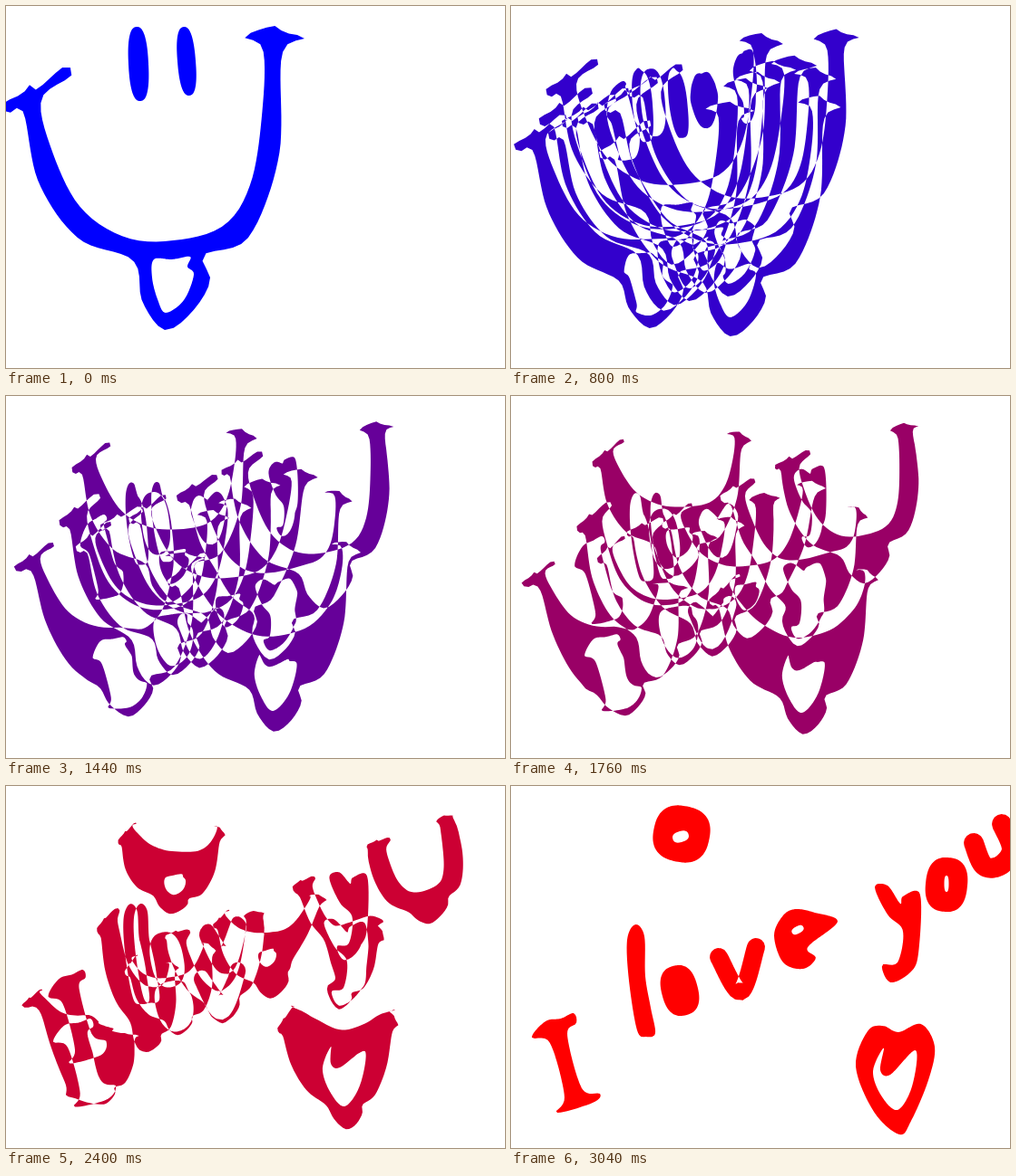
Write an HTML page with a canvas that moves like this. It is 550x400 px and loops after 3200 ms.

```html
<!DOCTYPE html>
<html>
<head>
<meta charset="utf-8">
<style>
html, body { margin: 0; width: 100%; height: 100%; overflow: hidden; background: #fff; }
canvas { display: block; }
</style>
</head>
<body>
<canvas id="stage" width="550" height="400"></canvas>
<script>
const ctx = document.getElementById('stage').getContext('2d');
const STEPS = 20, STEP_MS = 160, SAMPLES = 40;
const { PI, abs, cos, sin, sign, hypot, round, floor, min, max } = Math;

const lerp = (a, b, t) => a + (b - a) * t;
const range = (n, fn) => Array.from({ length: n }, (_, i) => fn(i));

function spline(p0, p1, p2, p3, t) {
  return p1.map((b, k) => {
    const a = p0[k], c = p2[k], d = p3[k];
    return b + t / 2 * (c - a + t * (2 * a - 5 * b + 4 * c - d + t * (3 * (b - c) + d - a)));
  });
}

// Spread SAMPLES evenly spaced points along an open polyline.
function resample(line) {
  const dist = [0];
  for (let i = 1; i < line.length; i++)
    dist.push(dist[i - 1] + hypot(line[i][0] - line[i - 1][0], line[i][1] - line[i - 1][1]));
  let i = 1;
  return range(SAMPLES, n => {
    const d = dist[dist.length - 1] * n / SAMPLES;
    while (dist[i] < d) i++;
    const t = (d - dist[i - 1]) / (dist[i] - dist[i - 1] || 1);
    return line[i].map((v, k) => lerp(line[i - 1][k], v, t));
  });
}

const parse = text => text.split(' ').map(p => p.split(',').map(Number));

// Every contour runs clockwise in four sections starting at its left, top, right and bottom.
function outline(text) {
  const sections = text.split('/').map(parse), points = sections.flat();
  const at = i => points[(i + points.length) % points.length];
  let start = 0;
  return sections.flatMap(({ length }) => {
    const line = range(length * 8 + 1, n => {
      const i = start + floor(n / 8);
      return spline(at(i - 1), at(i), at(i + 1), at(i + 2), n % 8 / 8);
    });
    start += length;
    return resample(line);
  });
}

function oval(cx, cy, rx, ry, tilt = 0) {
  const soft = v => sign(v) * abs(v) ** 0.8;
  return range(SAMPLES * 4, i => {
    const a = PI + i / SAMPLES * PI / 2, x = rx * soft(cos(a)), y = ry * soft(sin(a));
    return [cx + x * cos(tilt) - y * sin(tilt), cy + x * sin(tilt) + y * cos(tilt)];
  });
}

// A round-ended brush stroke drawn from its left tip to its right tip.
function brush(radius, text) {
  const keys = parse(text), last = keys.length - 1;
  const at = i => keys[max(0, min(last, i))];
  const path = range(last * 12 + 1, n => {
    const i = floor(n / 12);
    return spline(at(i - 1), at(i), at(i + 1), at(i + 2), n % 12 / 12);
  });
  const angle = i => {
    const a = path[max(0, i - 1)], b = path[min(path.length - 1, i + 1)];
    return Math.atan2(b[1] - a[1], b[0] - a[0]);
  };
  const edge = (i, turn) => [path[i][0] + radius * cos(angle(i) + turn), path[i][1] + radius * sin(angle(i) + turn)];
  const end = path.length - 1, mid = end / 2;
  const cap = (i, from) => range(5, k => edge(i, from + k * PI / 8));
  const side = (from, turn) => range(mid + 1, k => edge(from + k * (turn < 0 ? 1 : -1), turn));
  return [
    [...cap(0, -PI), ...side(0, -PI / 2)],
    [...side(mid, -PI / 2), ...cap(end, -PI / 2)],
    [...cap(end, 0), ...side(end, PI / 2)],
    [...side(mid, PI / 2), ...cap(0, PI / 2)]
  ].flatMap(resample);
}

const face = {
  smile: outline('-4,108 18,97 25,87 34,92 64,67 72,77 39,103 50,158 80,220 125,253' +
    '/175,260 238,244 270,195 283,110 283,47 263,34 296,22 306,29' +
    '/329,36 304,54 301,165 267,256 218,275 225,304 205,338' +
    '/175,358 150,326 140,281 80,257 36,195 19,117 2,119'),
  tongue: outline('161,300 163,280/183,280 203,277 200,288/207,297 196,325/176,339 167,324'),
  eyeL: oval(146, 64, 11, 41, -0.05),
  eyeR: oval(199, 61, 10, 38, -0.08)
};

const letters = {
  I: outline('23,278 38,260 55,257/69,251 72,262 62,275 78,334/98,340/90,350 50,361 59,343 43,284'),
  l: outline('128,170 137,153 147,166/148,210/154,245 159,273/149,277 139,270 130,215'),
  o: oval(186, 226, 20, 28, -0.25),
  v: brush(10, '229,189 253,227 270,178'),
  e: outline('290,165 300,143/314,136 335,140/360,150 327,178 336,190/322,202 300,195'),
  eHole: oval(316, 159, 7, 4, -0.5),
  y: outline('401,112 415,110 429,130/432,122 451,120 449,185/440,206/418,217 409,198 426,195 432,160 415,142'),
  o2: oval(480, 109, 23, 30, 0.1),
  o2Hole: oval(480, 108, 2.5, 9),
  u: brush(11, '510,63 521,88 539,88 552,70 541,42'),
  ring: oval(188, 53, 31, 31, 0.2),
  ringHole: oval(187, 56, 9, 6, -0.3),
  heart: outline('380,310 393,271 410,265/427,272 452,263 467,288/460,325 441,370/428,385 400,360'),
  heartHole: outline('399,315 411,289 407,314/418,319/446,292 442,332/426,358 408,342')
};

// One face contour grows into several letter contours; overlaps cancel out.
const morphs = {
  smile: 'I l o v e y u ring heart',
  tongue: 'I o v y eHole ringHole heartHole',
  eyeL: 'I l o',
  eyeR: 'y l v'
};
const pairs = Object.entries(morphs).flatMap(([from, names]) =>
  names.split(' ').map(name => [face[from], letters[name]]));

// Blue fades to red in web-safe steps.
function color(step) {
  const t = step / STEPS, web = v => round(v * 5) * 51;
  return `rgb(${web(t)}, 0, ${web(0.99 - t)})`;
}

function shapesAt(step) {
  const t = step / (STEPS - 1);
  if (t === 0) return Object.values(face);
  if (t === 1) return Object.values(letters);
  return pairs.map(([a, b]) => a.map(([x, y], i) => [lerp(x, b[i][0], t), lerp(y, b[i][1], t)]));
}

function draw(step) {
  ctx.clearRect(0, 0, 550, 400);
  ctx.fillStyle = color(step);
  ctx.beginPath();
  for (const shape of shapesAt(step)) {
    shape.forEach(([x, y], i) => i ? ctx.lineTo(x, y) : ctx.moveTo(x, y));
    ctx.closePath();
  }
  ctx.fill('evenodd');
}

let shown = -1;
function tick() {
  const step = floor(performance.now() / STEP_MS) % STEPS;
  if (step !== shown) draw(shown = step);
  requestAnimationFrame(tick);
}
tick();
</script>
</body>
</html>
```
